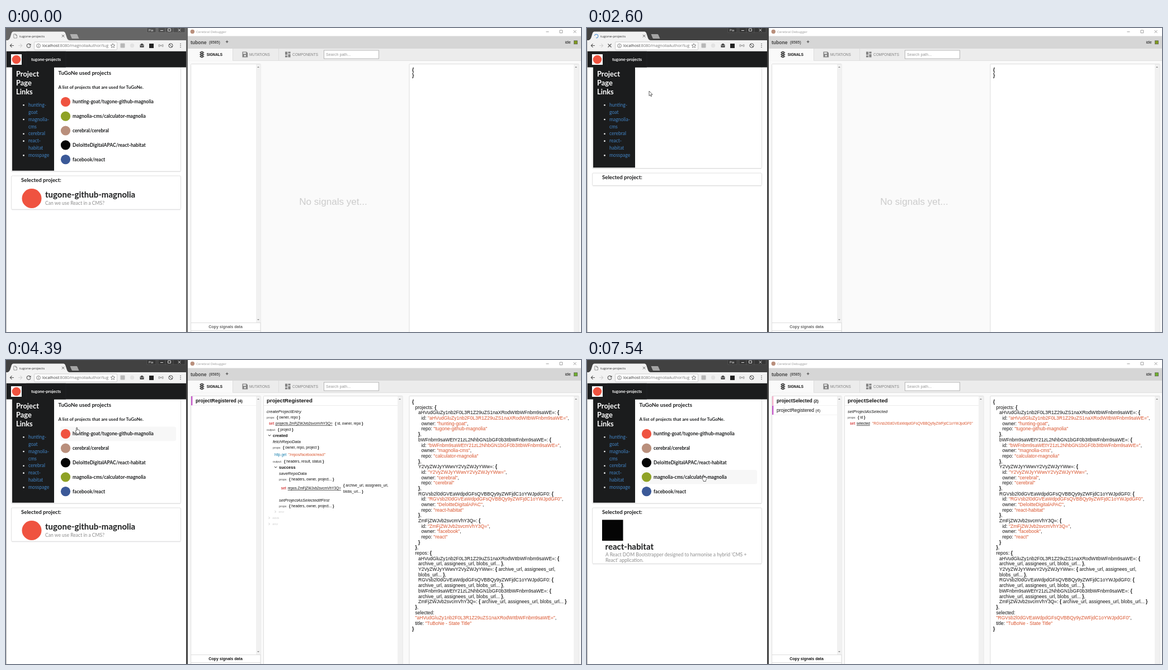
These frames come from a looping animation (1028x545 px, 7.99 s). An HTML page:

```html
<!DOCTYPE html>
<html lang="en">
<head>
<meta charset="utf-8">
<title>State debugger demo</title>
<style>
html, body { margin: 0; width: 100%; height: 100%; overflow: hidden; background: #fff; }
svg { display: block; width: 100vw; height: 100vh; }
.lato { font-family: Lato, sans-serif; fill: #1b1c1d; }
.ui { font-family: "Open Sans", "Noto Sans", sans-serif; }
.arial { font-family: "Liberation Sans", Arial, sans-serif; fill: #111; }
.b { font-weight: 700; }
.i { font-style: italic; }
.str { fill: #d9532c; }
.num { fill: #137cab; }
.link { fill: #4183c4; }
.white { fill: #fff; }
.note { fill: #8d8d8d; }
</style>
</head>
<body>
<svg id="stage" viewBox="0 0 1028 545" preserveAspectRatio="none" xmlns="http://www.w3.org/2000/svg"></svg>
<script>
const LOOP = 7990;
const REM = 8.567, SMALL = 6.42;
const ROW = 25.8;
const BRAND = 'TuGoNe', STORE = 'TuBoNe';
const HOST = 'hunting-goat', HOST_REPO = BRAND.toLowerCase() + '-github-magnolia';

const project = (owner, repo, color) => ({ owner, repo, color, path: owner + '/' + repo, id: btoa(owner + '/' + repo) });
const host = project(HOST, HOST_REPO, '#ef5340');
const magnolia = project('magnolia-cms', 'calculator-magnolia', '#8fa226');
const cerebral = project('cerebral', 'cerebral', '#b98f7c');
const habitat = project('DeloitteDigitalAPAC', 'react-habitat', '#050505');
const react = project('facebook', 'react', '#3b5998');
const firstOrder = [host, magnolia, cerebral, habitat, react];
const sortedOrder = [host, cerebral, habitat, magnolia, react];

const text = (x, y, size, s, attrs = '') => `<text x="${x}" y="${y}" font-size="${size}" ${attrs}>${s}</text>`;
const rect = (x, y, w, h, fill, attrs = '') => `<rect x="${x}" y="${y}" width="${w}" height="${h}" fill="${fill}" ${attrs}/>`;
const disc = (x, y, r, fill) => `<circle cx="${x}" cy="${y}" r="${r}" fill="${fill}"/>`;
const path = (d, stroke, width = 1, fill = 'none') => `<path d="${d}" fill="${fill}" stroke="${stroke}" stroke-width="${width}"/>`;
const group = (cls, ...parts) => `<g class="${cls}">${parts.join('')}</g>`;
const rich = s => s.replace(/"[^"]*"|[{}]|\bnull\b/g, m =>
  `<tspan class="${m[0] === '"' ? 'str' : m === 'null' ? 'num' : 'b'}">${m}</tspan>`);

const panel = (x, w) => rect(x, 64.5, w, 485, '#fff', 'stroke="#ddd" rx="1"');
const arrow = (x, y, dir) => path(`M${x - 2} ${y + dir}h4l-2 ${-2 * dir}z`, 'none', 0, '#888');
const scrollbar = x => rect(x, 65, 8, 480, '#f1f1f1') + arrow(x + 4, 70, 1);
const card = (y, bottom) =>
  rect(9.5, y, 303, bottom - y, '#fff', 'stroke="#d8d8d9" stroke-width=".8" rx="2"') +
  path(`M10 ${bottom + .6}h302`, '#d4d4d5', .6);

function browserFrame(active, loading) {
  const frame = active ? '#414141' : '#666';
  const button = (x, w) => rect(x, -1, w, 9, active ? '#353535' : '#4e4e4e', `stroke="${active ? '#5c5c5c' : '#7c7c7c'}" stroke-width=".6"`);
  const reload = loading
    ? path('M37.5 28.5l6 6m0-6l-6 6', '#555', 1.1)
    : path('M43.2 29.6a3.4 3.4 0 1 0 .7 2.8', '#555', 1.1) + path('M44.5 28v3.2h-3.2z', 'none', 0, '#555');
  return rect(0, 0, 325, 22, frame) + rect(322, 0, 3, 545, frame) + rect(0, 22, .7, 523, '#999') +
    button(252, 16) + button(272, 13) + button(285, 14) + button(299, 21) +
    path('M276 4.5h5M289.5 1.5h5v4h-5zM307.7 1.5l4.5 4.5m0-4.5l-4.5 4.5', '#e8e8e8', .9) +
    path('M3 22Q6 21 7.5 17L10 9Q11 6.5 13 6.5H103Q105 6.5 106 9L109 18Q110.5 22 114 22z', 'none', 0, '#f2f2f2') +
    path('M114.5 11h11.5q1 0 1.5 1l3 7h-11.5q-1.2 0-1.7-1.2z', 'none', 0, active ? '#a4a4a4' : '#b0b0b0') +
    rect(.7, 22, 321.3, 19.5, '#f2f2f2') +
    path('M14 31.5H7.5m3-3.2l-3.2 3.2 3.2 3.2', '#555', 1.1) +
    path('M22 31.5h6.5m-3-3.2l3.2 3.2-3.2 3.2', '#d0d0d0', 1.1) + reload +
    rect(50.5, 25, 148, 14, '#fff', 'stroke="#bbb" stroke-width=".7" rx="1.5"') +
    `<circle cx="58" cy="31.8" r="3.4" fill="none" stroke="#666" stroke-width=".8"/>` +
    path('M58 31.2v2.5M58 29.6v.9', '#666', .9) +
    path('M191 27.8l1.1 2.6 2.8.2-2.2 1.8.8 2.8-2.5-1.5-2.5 1.5.8-2.8-2.2-1.8 2.8-.2z', '#555', .7) +
    group('ui',
      text(255, 6, 5.8, 'Pia', 'class="white"'),
      text(24, 16.6, 6.15, BRAND.toLowerCase() + '-projects', 'fill="#333"'),
      text(65, 34.3, 7.15, 'localhost<tspan fill="#777">:8080/magnoliaAuthor/reh</tspan>'.replace('reh', 'tug'), 'fill="#333"')) +
    path('M99.8 12l4.5 4.5m0-4.5l-4.5 4.5', '#555', .9) +
    rect(204.5, 27.5, 8, 8, '#b8b8b8', 'rx="1"') + disc(225.5, 31.5, 3.7, '#e2e2e2') +
    path('M239.5 29.8l3.5-2.3 3.5 2.3v5h-7z', 'none', 0, '#444') + path('M239.5 30l3.5 2.4 3.5-2.4', '#f2f2f2', .8) +
    rect(256, 28, 8, 8, '#222') +
    disc(277, 31.6, 1, '#666') + path('M275 29.5q-1.3 2 0 4M279 29.5q1.3 2 0 4M273.7 29q-1.7 2.6 0 5.2M280.3 29q1.7 2.6 0 5.2', '#777', .7) +
    `<circle cx="294.5" cy="31.5" r="3.6" fill="none" stroke="#444"/>` + path('M292 29l5 5', '#444') +
    [28.5, 31.5, 34.5].map(y => disc(312, y, .8, '#555')).join('');
}

function sidebar(bottom) {
  const links = ['hunting-', 'goat', 'magnolia-', 'cms', 'cerebral', 'react-', 'habitat', 'mosspage'];
  return rect(11, 70, 75, bottom - 70, '#1b1c1d') +
    ['Project', 'Page', 'Links'].map((s, i) => text(18, 86.5 + 16.4 * i, 12.85, s, 'class="b white"')).join('') +
    links.map((s, i) => text(40, 141 + 12.87 * i, REM, s, 'class="link"')).join('') +
    [0, 2, 4, 5, 7].map(i => disc(31.5, 138.3 + 12.87 * i, 1.3, '#fff')).join('');
}

function projectList(order, hover) {
  return text(93.5, 83.6, 9.64, BRAND + ' used projects', 'class="b"') +
    text(93.5, 108.6, 8.1, `A list of projects that are used for ${BRAND}.`, 'class="b"') +
    order.map((p, i) => {
      const y = 132.4 + ROW * i;
      return (i === hover ? rect(97, y - 12.8, 207, 25.6, '#f7f7f7', 'rx="3"') : '') +
        disc(106.5, y, 8.6, p.color) + text(119, y + 3, REM, p.path, 'class="b"');
    }).join('');
}

function selectedCard(p) {
  const heading = y => text(27, y, 9.64, 'Selected project:', 'class="b"');
  const title = (x, y) => text(x, y, 15, p.repo, 'class="b"');
  const note = (x, y, s) => text(x, y, REM, s, 'class="note"');
  if (!p) return card(260, 282.5) + heading(270.6);
  if (p === habitat) return card(265, 365.2) + heading(276) + rect(27, 286.5, 37.5, 37.5, p.color) + title(32.5, 339.8) +
    note(33, 352, "A React DOM Bootstrapper designed to harmonise a hybrid 'CMS +") + note(33, 362, "React' application.");
  return card(265, 325.2) + heading(276) + disc(46, 305.5, p === host ? 17.5 : 16, p.color) + title(70, 304.4) +
    note(70, 317, p === host ? 'Can we use React in a CMS?' : 'A state controller with its own debugger');
}

function page(s) {
  const bottom = s.order ? 257 : 251.5;
  return group('lato',
    rect(.7, 41.5, 321.3, 503.5, '#fff'), card(60, bottom),
    rect(.7, 41.5, 321.3, 29, '#1b1c1d'),
    rect(36, 41.5, 71, 29, s.navHover ? '#2b2c2d' : '#1b1c1d'),
    path('M36 42v28M107 42v28', '#2a2b2c', .6),
    rect(9, 47, 19, 19, '#fff'), disc(18.5, 56.5, 7.8, '#ef5340'),
    text(45, 58.8, 7.5, BRAND.toLowerCase() + '-projects', 'class="b white"'),
    sidebar(bottom - 1.2), s.order ? projectList(s.order, s.hover) : '', selectedCard(s.selected));
}

function debuggerShell() {
  return rect(325, 0, 703, 545, '#fafafa') + rect(325, 0, 703, 14.5, '#fff') +
    disc(333.3, 6.5, 3.7, '#b98f7c') + group('ui', text(340, 9.2, 6.15, 'Cerebral Debugger', 'fill="#999"')) +
    path('M965.5 6.8h5M990 4h4.8v4.8h-4.8zM1014.5 4l5 5m0-5l-5 5', '#888', .8) +
    rect(325, 14.5, 703, 22.5, '#d6d6d6') + rect(325, 37, 703, 21.5, '#ececec') + rect(325, 37, 80.5, 21.5, '#fafafa') +
    path('M405.5 37v21.5M487.5 37v21.5', '#ddd') + path('M405.5 58.5H1028', '#dcdcdc', .8) +
    rect(347.8, 42, 4.8, 11, '#222', 'rx="1"') + path('M346 44h8.4M346 47.5h8.4M346 51h8.4', '#222', .9) +
    [44.2, 47.5, 50.8].map(y => disc(350.2, y, 1.1, '#fafafa')).join('') +
    path('M422.5 42.5h7.5l2.2 2.2v7.8h-9.7z', 'none', 0, '#858585') + rect(424, 43.8, 5, 2.5, '#ececec') + disc(427.3, 49.6, 1.6, '#ececec') +
    rect(499, 42.5, 4.2, 5.5, '#858585') + rect(504.4, 42.5, 4.2, 3.2, '#858585') +
    rect(499, 49.2, 4.2, 3.3, '#858585') + rect(504.4, 47, 4.2, 5.5, '#858585') +
    rect(568.5, 40, 98, 15, '#fff', 'stroke="#a5a5a5" stroke-width=".8"') +
    group('arial',
      text(330, 28.5, REM, STORE.toLowerCase(), 'class="b" style="fill:#444"'),
      text(363, 28.3, 6.8, '(8585)', 'class="b" style="fill:#555"'),
      text(392.6, 28.3, 9, '+', 'class="b" style="fill:#444"'),
      text(358.7, 49.9, 6.35, 'SIGNALS', 'class="b"'),
      text(435, 49.9, SMALL, 'MUTATIONS', 'style="fill:#808080"'),
      text(512, 49.9, SMALL, 'COMPONENTS', 'style="fill:#808080"'),
      text(572, 50, 7.1, 'Search path...', 'style="fill:#999"')) +
    panel(330.5, 124.5) + scrollbar(447) + rect(330.5, 528.5, 124.5, 14, '#fff', 'stroke="#ddd"') +
    rect(330.5, 542.5, 124.5, 10, '#fff', 'stroke="#ddd"') + arrow(451, 523, -1) + panel(721, 303) + scrollbar(1015);
}

function stateLines(s) {
  if (!s.trace) return [[0, '{'], [0, '}']];
  const id = s.trace === 'select' ? s.selected.id : host.id;
  const lines = [[0, '{'], [1, 'projects: {']];
  firstOrder.forEach((p, i) => lines.push([2, p.id + ': {'], [3, `id: "${p.id}",`], [3, `owner: "${p.owner}",`],
    [3, `repo: "${p.repo}"`], [2, i < 4 ? '},' : '}']));
  lines.push([1, '},']);
  if (s.trace === 'fetch') lines.push([1, 'repos: { },'], [1, 'selected: null,']);
  else {
    const rest = 'archive_url, assignees_url, blobs_url... }';
    const short = 'archive_url, assignees_url,';
    lines.push([1, 'repos: {'], [2, host.id + ': {'], [2, rest + ','],
      [2, `${cerebral.id}: { ${short}`], [2, 'blobs_url... },'],
      [2, habitat.id + ': {'], [2, rest + ','], [2, magnolia.id + ': {'], [2, rest + ','],
      [2, `${react.id}: { ${rest}`], [1, '},']);
    if (id.length < 30) lines.push([1, `selected: "${id}",`]);
    else lines.push([1, 'selected:'], [1, `"${id}",`]);
  }
  lines.push([1, `title: "${STORE} - State Title"`], [0, '}']);
  return lines;
}

const action = (x, y, s) => text(x, y, 7.5, s, 'class="i"');
const values = (x, y, label, s) => text(x, y, 5.3, label, 'style="fill:#444"') +
  text(x + (label === 'props:' ? 18 : 20), y, SMALL, rich(s));
const setOp = (x, y, target) => text(x, y, SMALL, 'set', 'class="b" style="fill:#d64242"') +
  text(x + 12, y, SMALL, target, 'text-decoration="underline"');
const openPath = (x, y, s) => path(`M${x} ${y - 4}l2.2 2.2 2.2-2.2`, '#222', 1) + text(x + 8, y, 7.5, s, 'class="b"');
const idlePath = (x, y, s) => path(`M${x} ${y - 2}l2 2-2 2`, '#bbb', .8) + text(x + 7, y + 1.5, 4.6, s, 'style="fill:#ccc"');

function trace(s) {
  if (s.trace === 'select') return action(466, 95, 'setProjectAsSelected') + values(466, 104.6, 'props:', '{ id }') +
    setOp(470, 116, 'selected') + text(510, 116, SMALL, `"${s.selected.id}"`, 'class="str"');
  const head = action(466, 95, 'createProjectEntry') + values(466, 104.6, 'props:', '{ owner, repo }') +
    setOp(470, 116, 'projects.' + react.id) + text(588, 116, SMALL, rich('{ id, owner, repo }')) +
    values(466, 126.7, 'output:', '{ project }') + openPath(469, 138, 'created') +
    action(477, 148.6, 'fetchRepoData') + values(477, 158.7, 'props:', '{ owner, repo, project }') +
    text(480, 171.7, SMALL, 'http.get', 'class="num"') + text(505, 171.7, SMALL, '"/repos/facebook/react"', 'class="str"');
  if (s.trace === 'fetch') return head + idlePath(480.5, 181, 'success') + idlePath(480.5, 192, 'error') +
    idlePath(469.5, 202.5, 'exists') + idlePath(469.5, 213, 'error');
  return head + values(477, 183.5, 'output:', '{ headers, result, status }') + openPath(480, 195, 'success') +
    action(488, 205.7, 'saveRepoData') + values(488, 215.7, 'props:', '{ headers, owner, project... }') +
    setOp(491.7, 232.2, 'repos.' + react.id) +
    text(603, 227.2, SMALL, rich('{ archive_url, assignees_url,')) + text(603, 237.7, SMALL, rich('blobs_url... }')) +
    action(488, 254, 'setProjectAsSelectedIfFirst') + values(488, 264, 'props:', '{ headers, owner, project... }') +
    idlePath(480.5, 272, 'error') + idlePath(469.5, 283, 'exists') + idlePath(469.5, 294, 'error');
}

function signalRow(i, name, count, color) {
  const y = 65 + 16.8 * i;
  return rect(331, y, 2.4, 16.3, color) + path(`M333 ${y + 16.5}h114`, '#eee', .7) +
    `<text x="339" y="${y + 11}" font-size="${REM}" ${i ? '' : 'class="b"'}>${name}` +
    (count > 1 ? `<tspan font-size="7" dx="2.5">(${count})</tspan>` : '') + '</text>';
}

function inspector(s) {
  const light = s.busy ? '#e8a11d' : s.trace ? '#6fae2d' : '#7f9a1e';
  const parts = [
    text(1009.5, 28.3, SMALL, s.busy ? 'executing' : 'idle', 'text-anchor="end"'),
    rect(1015.5, 22.8, 6, 6, light, 'stroke="#555" stroke-width=".7"'),
    text(392.5, 537.9, 7.1, 'Copy signals data', `class="b" text-anchor="middle" style="fill:${s.trace ? '#111' : '#666'}"`),
    ...stateLines(s).map(([depth, line], i) => text(726 + 5.5 * depth, 78.1 + 9.678 * i, REM, rich(line)))
  ];
  if (!s.trace) return group('arial', ...parts, text(585, 317, 17.1, 'No signals yet...', 'text-anchor="middle" style="fill:#ccc"'));
  const picked = s.trace === 'select';
  const name = picked ? 'projectSelected' : 'projectRegistered';
  return group('arial', ...parts, panel(460.5, 248.5), scrollbar(700), path('M461 81.5h239', '#e4e4e4', .7),
    text(466, 76.3, 9.64, name, 'class="b"'), trace(s),
    picked ? signalRow(0, name, s.count, '#f7b3cd') : '', signalRow(picked ? 1 : 0, 'projectRegistered', 4, '#c75bcb'));
}

// Pointer stops: time, x, y
const stops = [[350, 753, 470], [1120, 50, 52], [1270, 46, 33], [1680, 39, 28], [1990, 39, 28], [2600, 111, 113],
  [3000, 126, 121], [3560, 131, 122.5], [3760, 131, 122.5], [3990, 124, 121], [4390, 124, 121], [4930, 150, 156],
  [5850, 150, 156], [6180, 206, 181], [6330, 205.5, 183.5], [7350, 205.5, 183.5], [7540, 205.5, 206]];

function pointer(t) {
  if (t <= stops[0][0]) return stops[0].slice(1);
  const i = stops.findIndex(k => k[0] > t);
  if (i < 0) return stops[stops.length - 1].slice(1);
  const [t0, x0, y0] = stops[i - 1], [t1, x1, y1] = stops[i];
  const u = (t - t0) / (t1 - t0), e = u * u * (3 - 2 * u);
  return [x0 + (x1 - x0) * e, y0 + (y1 - y0) * e];
}

function cursor(t) {
  if (t < 350) return '';
  const [x, y] = pointer(t);
  const shape = t < 3000
    ? path('M0 0v8.6l2-1.8 1.3 3 1.4-.6-1.3-2.9h2.7z', '#222', .7, '#fff')
    : path('M1.8 6V1q0-1 .8-1t.8 1v3q2-.4 3.8 1 .8.4.8 1.4 0 2-1.2 3.8v1.4H2.7v-1.4L.2 7q-.4-1 .4-1.2z', '#222', .7, '#fff');
  return `<g transform="translate(${x} ${y})">${shape}</g>`;
}

function tabIcon(t, loading) {
  if (!loading) return path('M14 11h3.4l2 2v5H14zM17.2 11v2.2h2.2', '#666', .7, '#fff');
  return `<g transform="rotate(${(t - 1820) * .36} 16.7 14.6)">${path('M16.7 11.4a3.2 3.2 0 1 1-3.2 3.2', '#4a8fd6', 1)}</g>`;
}

function stateAt(t) {
  return {
    active: t >= 1820,
    loading: t >= 1820 && t < 3000,
    navHover: t >= 1060 && t < 1400,
    order: t < 2070 ? firstOrder : t < 3000 ? null : sortedOrder,
    hover: t > 3100 ? Math.floor((pointer(t)[1] - 119.5) / ROW) : -1,
    selected: t < 2070 ? host : t < 3150 ? null : t < 5430 ? host : t < 6840 ? cerebral : habitat,
    trace: t < 3150 ? '' : t < 3850 ? 'fetch' : t < 5430 ? 'save' : 'select',
    count: t < 6840 ? 1 : 2,
    busy: (t >= 3150 && t < 3990) || (t >= 5390 && t < 5480) || (t >= 6800 && t < 6900)
  };
}

const stage = document.getElementById('stage');
stage.innerHTML = debuggerShell() + ['inspector', 'page', 'frame', 'tab', 'cursor'].map(id => `<g id="${id}"></g>`).join('');
const shown = {};
function show(id, markup) {
  if (shown[id] === markup) return;
  shown[id] = markup;
  document.getElementById(id).innerHTML = markup;
}

function draw(t) {
  const s = stateAt(t);
  show('inspector', inspector(s));
  show('page', page(s));
  show('frame', browserFrame(s.active, s.loading));
  show('tab', tabIcon(t, s.loading));
  show('cursor', cursor(t));
}

let start;
function tick(now) {
  start ??= now;
  draw((now - start) % LOOP);
  requestAnimationFrame(tick);
}
draw(0);
requestAnimationFrame(tick);
</script>
</body>
</html>
```
